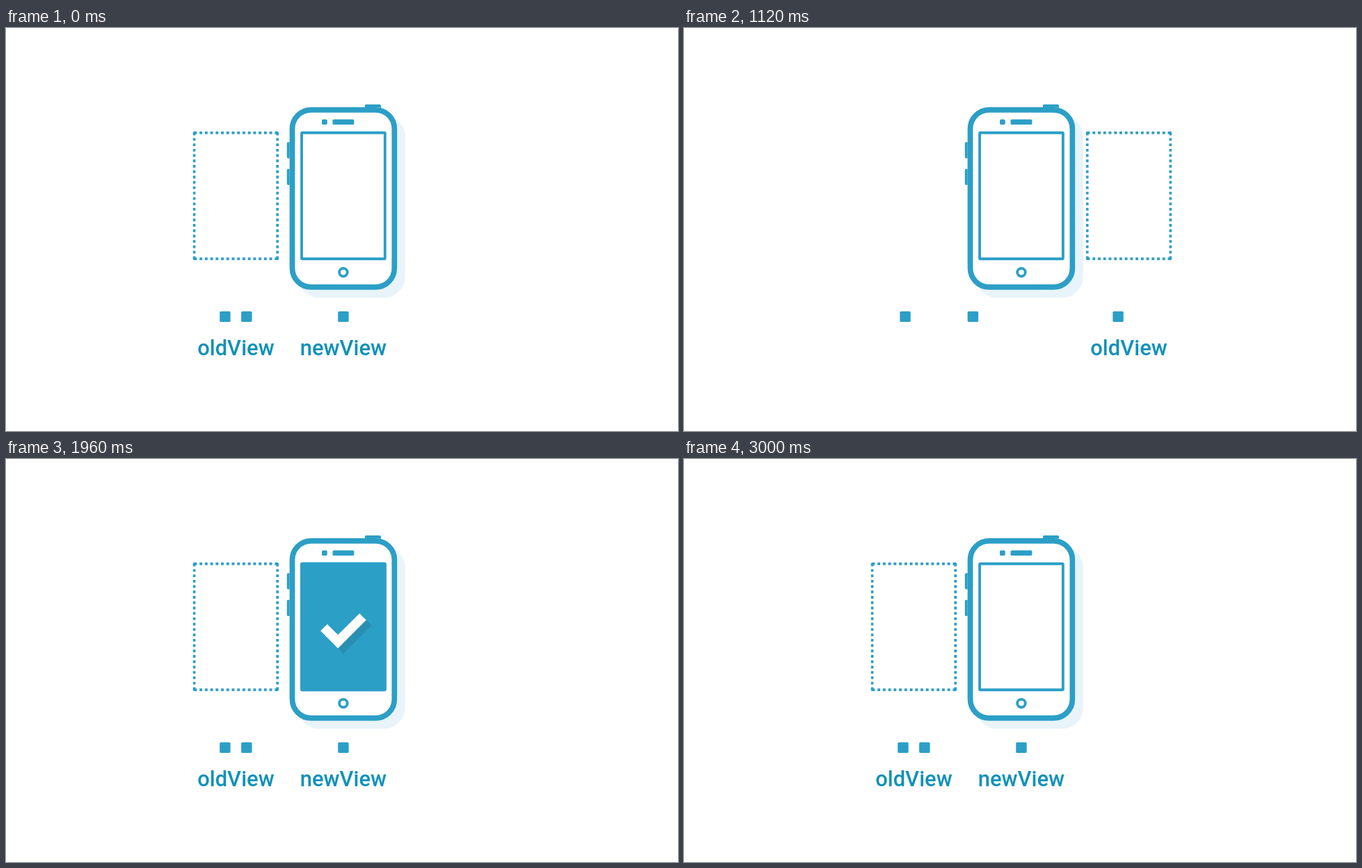
Write an HTML page with a canvas that moves like this. It is 966 px wide and 580 px high and loops after 3.5 s.

```html
<!DOCTYPE html>
<html lang="en">
<head>
<meta charset="utf-8">
<title>View transition</title>
<style>
  html, body { margin: 0; width: 100%; height: 100%; overflow: hidden; background: #fff; }
  canvas { display: block; width: 966px; height: 580px; }
</style>
</head>
<body>
<canvas id="stage" width="966" height="580"></canvas>
<script>
const ctx = document.getElementById('stage').getContext('2d');
const LOOP = 3500, STEP = 30, SCALE = 0.966;
const BLUE = '#2c9fc6', TEXT = '#1191b9';
const SCREEN = { x: 438, y: 154, w: 128, h: 192 };
const SHIFT = 160;
const CHECK = [[468, 256], [478, 246], [494, 262], [526, 230], [536, 240], [494, 282]];

const progress = (t, start, length) => Math.min(1, Math.max(0, (t - start) / length));

// The motion runs in 30 ms steps; the last fade starts on its own grid.
function stepped(t) {
  const phase = t < 2800 ? 10 : 0;
  return Math.floor((t - phase) / STEP) * STEP + phase;
}

function withAlpha(alpha, draw) {
  if (alpha <= 0) return;
  ctx.save();
  ctx.globalAlpha = alpha;
  draw();
  ctx.restore();
}

function clipped(x, y, w, h, draw) {
  ctx.save();
  ctx.beginPath();
  ctx.rect(x, y, w, h);
  ctx.clip();
  draw();
  ctx.restore();
}

function block(x, y, w, h, r = 2, color = BLUE) {
  ctx.fillStyle = color;
  ctx.beginPath();
  ctx.roundRect(x, y, w, h, r);
  ctx.fill();
}

// Border lying inside the given box.
function frame(x, y, w, h, line, r) {
  ctx.strokeStyle = BLUE;
  ctx.lineWidth = line;
  ctx.beginPath();
  ctx.roundRect(x + line / 2, y + line / 2, w - line, h - line, r - line / 2);
  ctx.stroke();
}

function dottedFrame(x) {
  const { y, w, h } = SCREEN;
  const left = x + 2, right = x + w - 2, top = y + 2, bottom = y + h - 2;
  ctx.save();
  ctx.beginPath();
  ctx.roundRect(x, y, w, h, 3);
  ctx.clip();
  ctx.strokeStyle = BLUE;
  ctx.lineWidth = 4;
  ctx.setLineDash([4, 4]);
  ctx.beginPath();
  for (const rowY of [top, bottom]) { ctx.moveTo(left, rowY); ctx.lineTo(right, rowY); }
  for (const colX of [left, right]) { ctx.moveTo(colX, top); ctx.lineTo(colX, bottom); }
  ctx.stroke();
  ctx.setLineDash([]);
  for (const cx of [x, x + w - 4])
    for (const cy of [y, y + h - 4]) block(cx, cy, 4, 4, 0);
  ctx.restore();
}

function checkMark(offset, color) {
  ctx.fillStyle = color;
  ctx.beginPath();
  for (const [x, y] of CHECK) ctx.lineTo(x + offset, y + offset);
  ctx.fill();
}

function label(text, x, alpha) {
  withAlpha(alpha, () => {
    ctx.fillStyle = TEXT;
    ctx.fillText(text, x, 487.5);
  });
}

function phoneBody() {
  block(418, 170, 8, 24);
  block(418, 210, 8, 24);
  block(534, 114, 24, 8);
  block(422, 118, 160, 272, 32, '#fff');
  frame(422, 118, 160, 272, 8, 32);
  block(470, 136, 8, 8);
  block(486, 136, 32, 8);
  ctx.lineWidth = 4;
  ctx.beginPath();
  ctx.arc(502, 364, 6, 0, Math.PI * 2);
  ctx.stroke();
}

function phoneScreen(slide, fill, check) {
  const { x, y, w, h } = SCREEN;
  if (slide > 0 && slide < 1) {
    const dx = slide * SHIFT;
    clipped(x, y, w, h, () => {
      frame(x + dx, y, w, h, 4, 3);
      frame(x - SHIFT + dx, y, w, h, 4, 3);
    });
  }
  withAlpha(fill, () => block(x, y, w, h, 3));
  withAlpha(fill * 0.1, () => checkMark(8, '#000'));
  withAlpha(check, () => checkMark(0, '#fff'));
  frame(x, y, w, h, 4, 3);
}

function render(t) {
  const slide = progress(t, 790, 300);
  const rightAlpha = 1 - progress(t, 1540, 150);
  const leftReturn = progress(t, 1690, 150);
  const textBack = progress(t, 1660, 300);
  const fadeIn = progress(t, 1270, 120);
  const check = fadeIn * (1 - progress(t, 2530, 150));
  const fill = fadeIn * (1 - progress(t, 2850, 150));
  const reset = t >= 1690;

  ctx.setTransform(1, 0, 0, 1, 0, 0);
  ctx.fillStyle = '#fff';
  ctx.fillRect(0, 0, 966, 580);
  ctx.scale(SCALE, SCALE);
  ctx.font = '500 32px Roboto, sans-serif';
  ctx.textAlign = 'center';

  block(434, 130, 160, 272, 32, '#e8f4f9');

  // Dotted views outside the phone
  const dx = slide * SHIFT;
  clipped(0, 0, 414, 600, () => {
    if (reset) withAlpha(leftReturn, () => dottedFrame(278));
    else dottedFrame(278 + dx);
  });
  if (slide > 0)
    clipped(582, 0, 418, 600, () => withAlpha(rightAlpha, () => dottedFrame(438 + dx)));

  phoneBody();
  phoneScreen(slide, fill, check);

  // Markers move one after another
  const first = progress(t, 850, 300);
  const second = progress(t, 970, 300);
  const third = progress(t, 1090, 300);
  withAlpha(rightAlpha, () => block(494 + 160 * first, 422, 16, 16));
  block(350 + 144 * second, 422, 16, 16);
  block(318 + 32 * third, 422, 16, 16);
  if (reset) withAlpha(leftReturn, () => block(318, 422, 16, 16));

  // Labels
  const away = slide - textBack;
  label('oldView', 342 + 20 * away, 1 - away);
  label('oldView', 662 - 20 * (1 - away), away);
  label('newView', 502, t < 1270 ? 1 - progress(t, 790, 150) : fadeIn);
}

function tick() {
  render(stepped(performance.now() % LOOP));
  requestAnimationFrame(tick);
}
tick();
</script>
</body>
</html>
```
